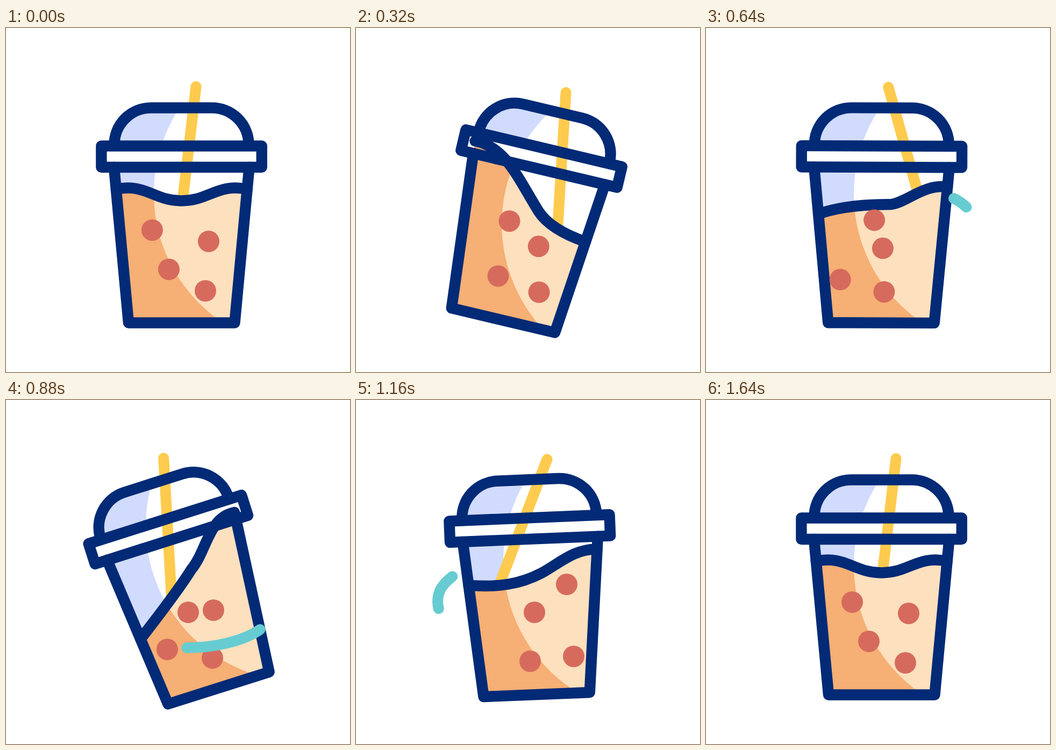
An HTML page that plays this animation: 640 px wide and 640 px high, repeating every 1800 ms.

```html
<!DOCTYPE html>
<html lang="en">
<head>
<meta charset="utf-8">
<title>Bubble tea</title>
<style>
  html, body { margin: 0; width: 100%; height: 100%; overflow: hidden; background: #fff; }
  svg { display: block; width: 100%; height: 100%; }
  .line { fill: none; stroke: #022a76; stroke-width: 20.4; stroke-linecap: round; stroke-linejoin: round; }
  .stick { fill: none; stroke-width: 20; stroke-linecap: round; }
  #straw { stroke: #ffcb4e; }
  #swoosh { stroke: #66ccd1; }
  #pearls { fill: #d66b5d; }
</style>
</head>
<body>
<svg viewBox="0 0 640 640">
  <defs>
    <path id="dome" d="M201.5 219V217A68.5 68.5 0 0 1 270 148.5H383A68.5 68.5 0 0 1 451.5 217V219"/>
    <path id="body" d="M201 259L228 548.5H425.5L452.5 259"/>
    <clipPath id="glass"><use href="#dome"/><use href="#body"/></clipPath>
    <clipPath id="teaClip"><path id="teaShape"/></clipPath>
  </defs>
  <g id="cup">
    <g clip-path="url(#glass)">
      <path fill="#d1dbfd" d="M180 130H400V560H180Z"/>
      <circle cx="564" cy="308" r="289" fill="#fff"/>
    </g>
    <path id="straw" class="stick" d="M353.5 109L316 428"/>
    <g clip-path="url(#teaClip)">
      <path fill="#f6af74" d="M180 200H480V560H180Z"/>
      <circle cx="564" cy="308" r="289" fill="#fde0be"/>
    </g>
    <path id="surface" class="line"/>
    <use href="#body" class="line"/>
    <use href="#dome" class="line"/>
    <rect class="line" x="177.4" y="219.5" width="298.4" height="39.5"/>
  </g>
  <g id="pearls">
    <circle r="20"/><circle r="20"/><circle r="20"/><circle r="20"/>
  </g>
  <path id="swoosh" class="stick" d="M461 317C487 330 505 352 505 375C505 430 420 461 335 461
    C250 461 153 437 152 375C152 352 165 338 188 322"/>
</svg>
<script>
const LOOP = 1800, STEP = 20;
const $ = id => document.getElementById(id);

// Monotone cubic through keys; turning points and both ends have zero slope.
function track(times, values) {
  const rate = i => (values[i + 1] - values[i]) / (times[i + 1] - times[i]);
  const slopes = values.map((_, i) => {
    if (i === 0 || i === values.length - 1) return 0;
    const a = rate(i - 1), b = rate(i);
    return a * b > 0 ? 2 * a * b / (a + b) : 0;
  });
  return t => {
    const last = times.length - 1;
    if (t <= times[0]) return values[0];
    if (t >= times[last]) return values[last];
    let i = 0;
    while (t >= times[i + 1]) i++;
    const d = times[i + 1] - times[i], u = (t - times[i]) / d, v = 1 - u;
    return v * v * ((1 + 2 * u) * values[i] + u * d * slopes[i])
         + u * u * ((3 - 2 * u) * values[i + 1] - v * d * slopes[i + 1]);
  };
}

// One track per coordinate of a pose.
const poseTracks = (times, poses) =>
  poses[0].map((_, i) => track(times, poses.map(pose => pose[i])));

const tilt = track([0, 480, 800, 918, 1232], [0, 18, -17.6, -17.6, 0]);
const strawTilt = track([0, 550, 1035, 1640], [0, -26.6, 18.5, 0]);
const swooshHead = track([550, 1215], [0, 1]);
const swooshTail = track([675, 1310], [0, 1]);

// Tea surface: left height, two handles, middle, two handles, right height.
const calm = [300, 258, 288, 276, 321.5, 326.5, 321.5, 377, 321.5, 395, 288, 300];
const forward = [236, 256, 233, 291, 283, 344, 336, 367, 358, 403, 367, 371];
const back = [418, 245, 397, 305, 357, 345, 323, 382, 300, 405, 240, 246];
const settling = [340, 262, 347, 305, 342, 345, 323, 378, 307, 408, 280, 283];
const surface = poseTracks([0, 320, 480, 760, 880, 1160, 1640],
  [calm, forward, forward, back, back, settling, calm]);

// Each pearl drifts from rest through three points and home again.
const pearls = [
  [[272, 376], [303, 349], [339, 395], [332, 395]],
  [[377, 397], [317, 412], [386, 391], [392, 343]],
  [[303, 449], [241, 469], [300, 464], [324, 486]],
  [[371, 489], [322, 493], [384, 480], [405, 477]]
].map(points => poseTracks([0, 550, 880, 1160, 1640], [...points, points[0]]));

const pearlDots = [...$("pearls").children];
const swooshLength = $("swoosh").getTotalLength();
const wallInset = y => 0.0934 * (y - 259);

function drawTea(t) {
  const p = surface.map(f => f(t)), left = p[0], right = p[11];
  const wave = `M${201 + wallInset(left)} ${left}C${p.slice(1, 7).join(" ")}`
    + `C${p.slice(7, 11).join(" ")} ${452.5 - wallInset(right)} ${right}`;
  $("surface").setAttribute("d", wave);
  $("teaShape").setAttribute("d", wave + "L425.5 548.5H228Z");
}

function drawSwoosh(t) {
  const tail = swooshTail(t) * swooshLength;
  const visible = swooshHead(t) * swooshLength - tail;
  const style = $("swoosh").style;
  style.display = visible > 0.1 ? "" : "none";
  style.strokeDasharray = `${visible} ${2 * swooshLength}`;
  style.strokeDashoffset = -tail;
}

function draw() {
  const t = Math.floor(performance.now() % LOOP / STEP) * STEP;
  $("cup").setAttribute("transform", `rotate(${tilt(t)} 320 320)`);
  $("straw").setAttribute("transform", `rotate(${strawTilt(t)} 348.7 147)`);
  drawTea(t);
  pearls.forEach(([x, y], i) => {
    pearlDots[i].setAttribute("cx", x(t));
    pearlDots[i].setAttribute("cy", y(t));
  });
  drawSwoosh(t);
  requestAnimationFrame(draw);
}
draw();
</script>
</body>
</html>
```
